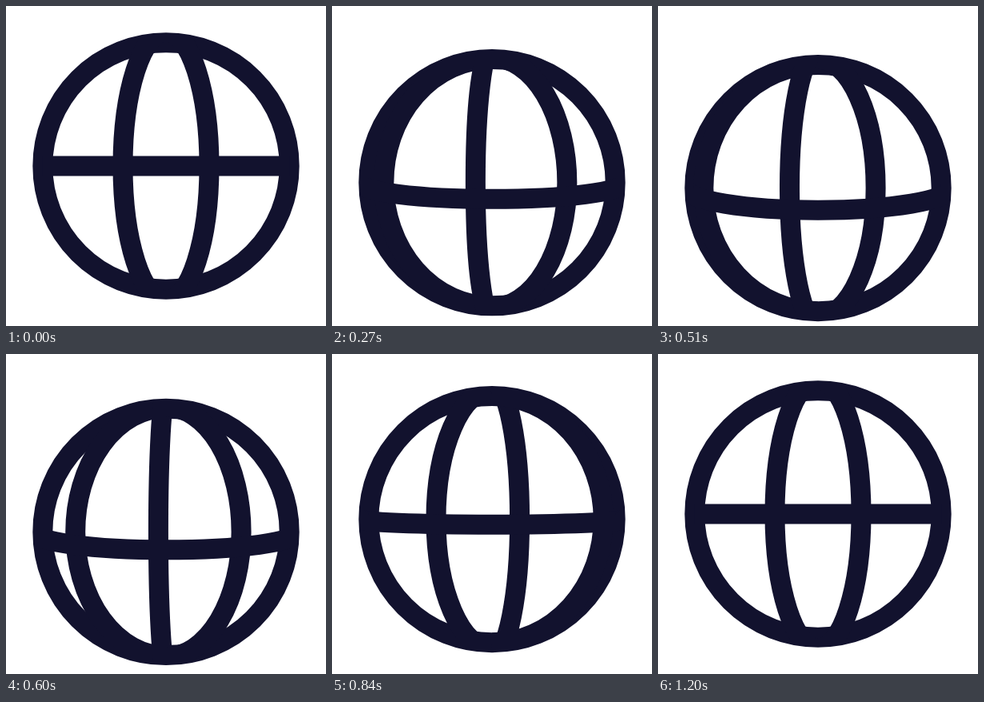
These frames come from a looping animation (400 px wide and 400 px high, 3.23 s). An HTML page with a canvas:

```html
<!DOCTYPE html>
<html lang="en">
<head>
<meta charset="utf-8">
<title>Spinning globe</title>
<style>
  html, body { margin: 0; width: 100%; height: 100%; overflow: hidden; background: #fff; }
  canvas { display: block; width: 100vw; height: 100vh; }
</style>
</head>
<body>
<canvas id="stage"></canvas>
<script>
const LOOP = 3230, SPIN = 1200, STEP = 30, PEAK = 420;
const SIZE = 400, RADIUS = 154.17, LINE = 25, GAP = 108, TURNS = 3, DROP = 29.2;
const INK = '#12122e';

const canvas = document.getElementById('stage');
const ctx = canvas.getContext('2d');

// Spacing of the meridians over the spin: [progress, factor]
const SPREAD = [[0, 1], [.225, 1.06], [.325, 1.045], [.5, .96], [.6, .955], [.8, .982], [1, 1]];

function lerpKeys(keys, p) {
  let i = 1;
  while (i < keys.length - 1 && p > keys[i][0]) i++;
  const [p0, v0] = keys[i - 1], [p1, v1] = keys[i];
  return v0 + (v1 - v0) * (p - p0) / (p1 - p0);
}

// cubic-bezier(x1, 0, x2, 1), solved by bisection
function ease(x, x1, x2) {
  let lo = 0, hi = 1, t = x;
  for (let i = 0; i < 24; i++) {
    t = (lo + hi) / 2;
    const s = 1 - t;
    if (3 * s * s * t * x1 + 3 * s * t * t * x2 + t * t * t < x) lo = t; else hi = t;
  }
  return t * t * (3 - 2 * t);
}

function dropAt(ms) {
  if (ms <= 0 || ms >= SPIN) return 0;
  return ms < PEAK
    ? DROP * ease(ms / PEAK, 1 / 3, 2 / 3)
    : DROP * (1 - ease((ms - PEAK) / (SPIN - PEAK), .3, 1 / 3));
}

function arc(rx, ry, from, to) {
  ctx.beginPath();
  ctx.ellipse(0, 0, rx, ry, 0, from, to);
  ctx.stroke();
}

function meridian(x) {
  const rx = Math.abs(x);
  if (rx >= RADIUS) return;
  const ry = RADIUS + 18 / (1 + (rx / 68) ** 6);
  const from = x < 0 ? Math.PI / 2 : -Math.PI / 2;
  arc(rx, ry, from, from + Math.PI);
}

function equator(drop) {
  if (drop > .05) return arc(165, drop, 0, Math.PI);
  ctx.fillRect(-RADIUS, -LINE / 2, RADIUS * 2, LINE);
}

function draw(ms) {
  const p = Math.min(ms / SPIN, 1);
  const left = (1 - p) ** (2.22 + .24 * p);
  const spread = lerpKeys(SPREAD, p);
  const drop = dropAt(ms);

  ctx.fillStyle = '#fff';
  ctx.fillRect(0, 0, SIZE, SIZE);
  ctx.save();
  ctx.translate(SIZE / 2, SIZE / 2 + drop);
  ctx.strokeStyle = ctx.fillStyle = INK;
  ctx.lineWidth = LINE;
  arc(RADIUS, RADIUS, 0, Math.PI * 2);

  ctx.beginPath();
  ctx.arc(0, 0, RADIUS + LINE / 2 - 1, 0, Math.PI * 2);
  ctx.clip();
  for (let k = 0; k < TURNS + 2; k++) {
    meridian((GAP * (k - .5) - GAP * TURNS * left) * spread);
  }
  equator(drop);
  ctx.restore();
}

function fit() {
  const ratio = window.devicePixelRatio || 1;
  canvas.width = Math.round(innerWidth * ratio);
  canvas.height = Math.round(innerHeight * ratio);
  ctx.setTransform(canvas.width / SIZE, 0, 0, canvas.height / SIZE, 0, 0);
}

const start = performance.now();
function tick() {
  const ms = (performance.now() - start) % LOOP;
  draw(Math.floor(ms / STEP) * STEP);
  requestAnimationFrame(tick);
}

addEventListener('resize', fit);
fit();
tick();
</script>
</body>
</html>
```
